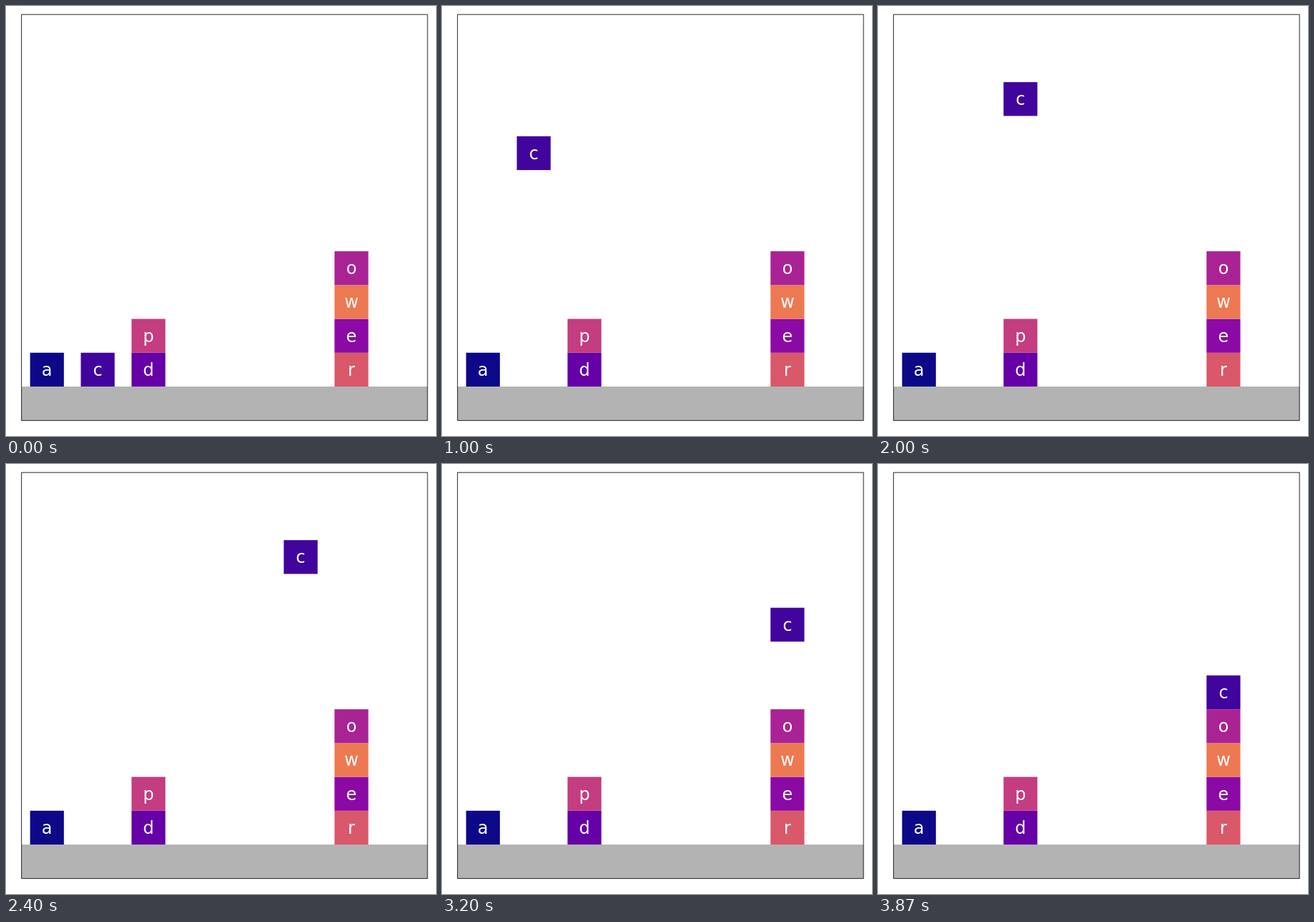
Recreate the animation shown at these times as an HTML page. Size 600 px wide and 600 px high, loop 4.87 s.

```html
<!DOCTYPE html>
<html lang="en">
<head>
<meta charset="utf-8">
<title>Blocks</title>
<style>
  html, body { margin: 0; width: 100%; height: 100%; overflow: hidden; background: #fff; }
  svg { display: block; width: 100%; height: 100%; }
  text { font: 24px "DejaVu Sans", sans-serif; fill: #fff; text-anchor: middle; }
</style>
</head>
<body>
<svg id="stage" viewBox="0 0 600 600">
  <rect x="21.8" y="531" width="566.3" height="47.2" fill="#b3b3b3"/>
  <g id="blocks"></g>
  <rect x="21.7" y="11.9" width="566.4" height="566.4" fill="none" stroke="#000" stroke-width="0.85"/>
</svg>
<script>
const UNIT = 47.2, COLUMN = 1.5 * UNIT;
const LEFT = 33.6, GROUND = 531;
const LOOP = 4870, LAST = 58;
const NS = 'http://www.w3.org/2000/svg';
const layer = document.getElementById('blocks');

function add(parent, tag, attrs) {
  const node = document.createElementNS(NS, tag);
  for (const key in attrs) node.setAttribute(key, attrs[key]);
  return parent.appendChild(node);
}

function place(block, column, level) {
  const x = LEFT + column * COLUMN;
  const y = GROUND - (level + 1) * UNIT;
  block.setAttribute('transform', `translate(${x.toFixed(2)} ${y.toFixed(2)})`);
}

function makeBlock(letter, color, column, level) {
  const block = add(layer, 'g', {});
  add(block, 'rect', { width: UNIT, height: UNIT, fill: color });
  add(block, 'text', { x: UNIT / 2, y: 32 }).textContent = letter;
  place(block, column, level);
  return block;
}

makeBlock('a', '#0d0887', 0, 0);
makeBlock('d', '#6600a7', 2, 0);
makeBlock('p', '#c33d80', 2, 1);
makeBlock('r', '#d9586a', 6, 0);
makeBlock('e', '#8b0aa5', 6, 1);
makeBlock('w', '#ed7953', 6, 2);
makeBlock('o', '#a92395', 6, 3);
const mover = makeBlock('c', '#41049d', 1, 0);

// Position of the moving block: lift, pause, slide, lower.
function pose(step) {
  if (step < 1) return [1, 0];
  if (step <= 19) return [1, 0.4 * (step + 1)];
  if (step <= 29) return [1, 8];
  if (step <= 38) return [1 + 0.5 * (step - 28), 8];
  return [6, 8 - 0.2 * (step - 38)];
}

// 15 steps per second, with step times rounded to 10 ms.
function stepAt(ms) {
  const tick = Math.floor((ms % LOOP) / 10) * 10;
  return Math.min(LAST, Math.floor((tick + 4) * 0.015));
}

let start = null;
function draw(now) {
  if (start === null) start = now;
  place(mover, ...pose(stepAt(now - start)));
  requestAnimationFrame(draw);
}
requestAnimationFrame(draw);
</script>
</body>
</html>
```
